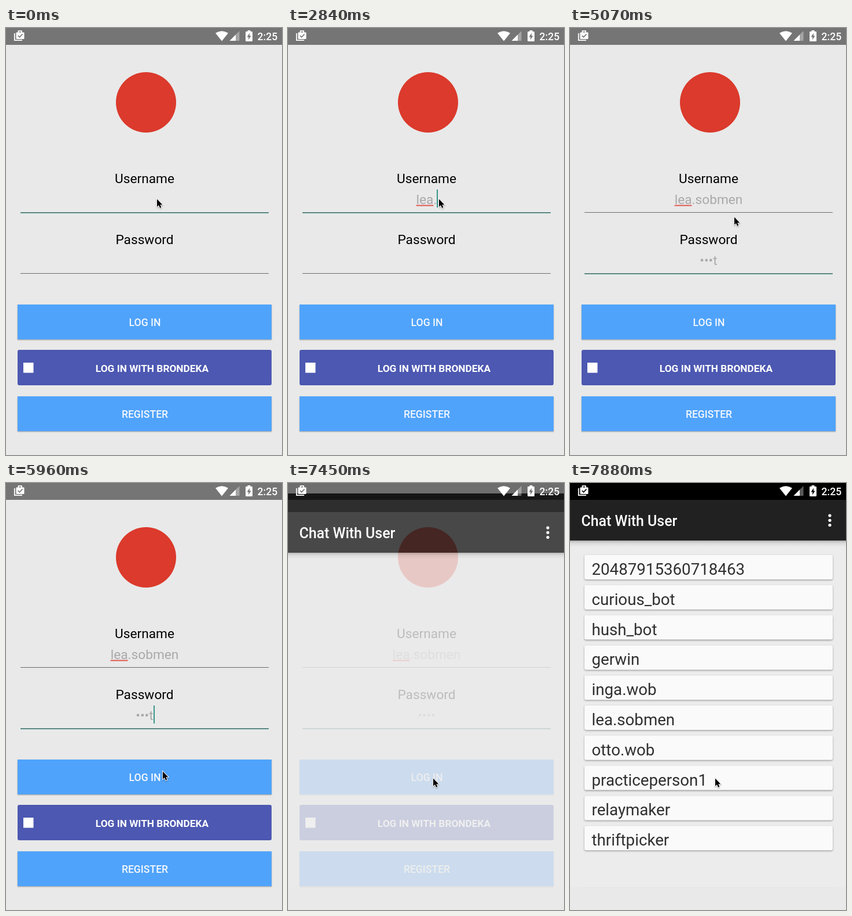
Animation, 477 px wide and 735 px high, one loop 8000 ms. Source, as an HTML page with a canvas:

```html
<!DOCTYPE html>
<html lang="en">
<head>
<meta charset="utf-8">
<title>Log in</title>
<style>
  html, body { margin: 0; width: 100%; height: 100%; overflow: hidden; background: #e9e9e9; }
  canvas { display: block; }
</style>
</head>
<body>
<canvas id="stage" width="477" height="735"></canvas>
<script>
const ctx = document.getElementById('stage').getContext('2d');
const LOOP = 8000, TICK = 148.6, MID = 239.5;
const FAMILY = 'Roboto, "Open Sans", sans-serif';
const USER = 'lea.sobmen', SECRET = 'test';
const ROWS = ['20487915360718463', 'curious_bot', 'hush_bot', 'gerwin', 'inga.wob',
  USER, 'otto.wob', 'practiceperson1', 'relaymaker', 'thriftpicker'];

// story beats, counted in screen ticks
const FIRST_KEY = 15, FOCUS_PASS = 27, LAST_KEY = 31, HIDE_LAST = 41;
const PRESS = 45, RELEASE = 47, OPEN = 50, LIST = 53;

const clamp = v => Math.max(0, Math.min(1, v));
const ease = u => u * u * (3 - 2 * u);
const burst = (n, from, to, keys) => Math.floor(clamp((n - from) / (to - from)) * keys + 1e-6);

// the caret blinks every half second and restarts with each key
function caretOn(n) {
  const since = n < FIRST_KEY ? n * TICK + 620 : (n - Math.min(n, LAST_KEY)) * TICK;
  return Math.floor((since + 140) / 500) % 2 === 0;
}

// the hand swings right, left, right and settles on the button
function pointerAt(n) {
  const stops = [[32, 260, 293], [34, 283, 324], [38, 238, 462], [40, 270, 495], [42, 250, 507]];
  let [, x, y] = stops[0];
  stops.slice(1).forEach(([end, toX, toY], i) => {
    const u = clamp((n - stops[i][0]) / (end - stops[i][0]));
    x += (toX - stops[i][1]) * ease(u);
    y += (toY - stops[i][2]) * u;
  });
  return [x, y];
}

function rect(x, y, w, h, color) {
  ctx.fillStyle = color;
  ctx.fillRect(x, y, w, h);
}

function box(x, y, w, h, r, color) {
  ctx.fillStyle = color;
  ctx.beginPath();
  ctx.roundRect(x, y, w, h, r);
  ctx.fill();
}

function disc(x, y, r, color) {
  ctx.fillStyle = color;
  ctx.beginPath();
  ctx.arc(x, y, r, 0, Math.PI * 2);
  ctx.fill();
}

function path(points, color) {
  ctx.fillStyle = color;
  ctx.beginPath();
  points.forEach(([x, y]) => ctx.lineTo(x, y));
  ctx.closePath();
  ctx.fill();
}

function text(str, x, y, size, color, weight = 400, align = 'left') {
  ctx.font = `${weight} ${size}px ${FAMILY}`;
  ctx.textAlign = align;
  ctx.fillStyle = color;
  ctx.fillText(str, x, y);
}

function shadowed(blur, dy, alpha, draw) {
  ctx.save();
  ctx.shadowColor = `rgba(0,0,0,${alpha})`;
  ctx.shadowBlur = blur;
  ctx.shadowOffsetY = dy;
  draw();
  ctx.restore();
}

// returns the left edge of the value
function field(label, value, y, focused, caret) {
  text(label, MID, y, 22.7, '#000', 400, 'center');
  text(value, MID, y + 36, 22.7, '#a9a9a9', 400, 'center');
  const half = ctx.measureText(value).width / 2;
  if (focused && caret) rect(Math.round(MID + half), y + 11, 2, 31, '#35978a');
  rect(25, y + 50, 429, 1, focused ? '#5c7a76' : '#6c6c6c');
  if (focused) rect(25, y + 51, 429, 1, '#55998f');
  return MID - half;
}

function button(label, y, pressed) {
  shadowed(pressed ? 4 : 2, pressed ? 2 : 1, pressed ? 0.45 : 0.35,
    () => rect(20, y, 439, 60, '#50a3fb'));
  text(label, MID + 0.5, y + 36.7, 17.6, '#f4f8fd', 500, 'center');
}

function login(n) {
  rect(0, 0, 477, 735, '#e9e9e9');
  disc(242, 128, 52, '#db3a2c');

  const typed = burst(n, 14, 17, 3) + burst(n, 18, 21, 4) + burst(n, 23, 26, 3);
  const secret = burst(n, FOCUS_PASS, LAST_KEY, 4);
  const onPass = n >= FOCUS_PASS, caret = caretOn(n);

  const left = field('Username', USER.slice(0, typed), 267, !onPass, caret);
  if (typed > 3) rect(left, 304.5, ctx.measureText(USER.slice(0, 3)).width, 2, '#e0594f');

  const open = secret && n < HIDE_LAST ? 1 : 0;
  const dots = '•'.repeat(secret - open) + (open ? SECRET[secret - 1] : '');
  field('Password', dots, 372, onPass, caret);

  button('LOG IN', 476, n >= PRESS && n < RELEASE);
  box(20, 554, 439, 61, 3, '#4c58b1');
  rect(30, 576, 17.5, 17.5, '#fff');
  text('LOG IN WITH BRONDEKA', 252.5, 591.5, 17.3, '#fff', 700, 'center');
  button('REGISTER', 634, false);
}

function chat(n, dy) {
  ctx.save();
  ctx.beginPath();
  ctx.rect(0, 0, 477, 696);
  ctx.clip();
  ctx.globalAlpha = clamp(0.8 + 0.2 * (n - OPEN));
  rect(0, 99 + dy, 477, 600, '#ececec');
  const shade = ctx.createLinearGradient(0, 99 + dy, 0, 110 + dy);
  shade.addColorStop(0, 'rgba(0,0,0,.26)');
  shade.addColorStop(0.4, 'rgba(0,0,0,.08)');
  shade.addColorStop(1, 'rgba(0,0,0,0)');
  rect(0, 99 + dy, 477, 11, shade);
  rect(0, dy - 3, 477, 32, '#000');
  rect(0, 29 + dy, 477, 70, '#212121');
  ctx.globalAlpha = 1;
  text('Chat With User', 19.5, 74 + dy, 24.9, '#fff', 500);
  for (let i = -1; i <= 1; i++) disc(449, 64.3 + i * 8.2 + dy, 2.6, '#fff');

  if (n >= LIST) ROWS.forEach((name, i) => {
    const y = 124 + i * 51.8;
    shadowed(3, 1.3, 0.36, () => box(25, y, 429, 42, 3, '#fafafa'));
    text(name, 37.5, y + 34, 27.7, '#303030');
  });
  ctx.restore();
}

function status(back) {
  const white = '#fff';
  // briefcase with a tick
  ctx.strokeStyle = white;
  ctx.lineWidth = 1.8;
  ctx.stroke(new Path2D('M14.8 9V21.2H28M21.5 9V5.2H27V9'));
  box(17.5, 7.5, 14, 11.5, 1, white);
  ctx.strokeStyle = back;
  ctx.stroke(new Path2D('M20.8 13l2.7 2.8 5-5.3'));

  // wireless fan and signal wedge
  ctx.fillStyle = white;
  ctx.fill(new Path2D('M373 22.5L362 8.8Q373 1.5 384 8.8Z'));
  path([[386.5, 22], [403.5, 22], [403.5, 5]], 'rgba(255,255,255,.35)');
  path([[386.5, 22], [397, 22], [397, 11.5]], white);

  // battery with a bolt
  box(414, 6, 12, 17, 1.2, white);
  rect(417.5, 4, 5, 3, white);
  ctx.fillStyle = back;
  ctx.fill(new Path2D('M421.2 8.5l-4.7 7h2.8l-.5 5 4.7-7h-2.8z'));

  text('2:25', 434.5, 21, 17.6, white, 500);
}

function pointer(x, y) {
  const arrow = new Path2D('M0 0V13.4L3 10.6 5.1 15.4 7.4 14.4 5.3 9.8H9.4Z');
  ctx.save();
  ctx.translate(x + 1, y + 1.4);
  ctx.strokeStyle = '#fff';
  ctx.lineWidth = 1.8;
  shadowed(2, 1, 0.35, () => ctx.stroke(arrow));
  ctx.fillStyle = '#000';
  ctx.fill(arrow);
  ctx.restore();
}

function draw(t) {
  const n = Math.floor(t / TICK);
  const opening = n >= OPEN;
  const dy = Math.round(21 * (1 - clamp((n - OPEN) / 2)) ** 3);
  const back = !opening ? '#757575' : n === OPEN ? '#6e6e6e' : '#000';
  login(n);
  rect(0, 0, 477, 29, back);
  if (opening) chat(n, dy);
  status(back);
  pointer(...pointerAt(n));
}

const start = performance.now();
function tick() {
  draw((performance.now() - start) % LOOP);
  requestAnimationFrame(tick);
}
tick();
</script>
</body>
</html>
```
